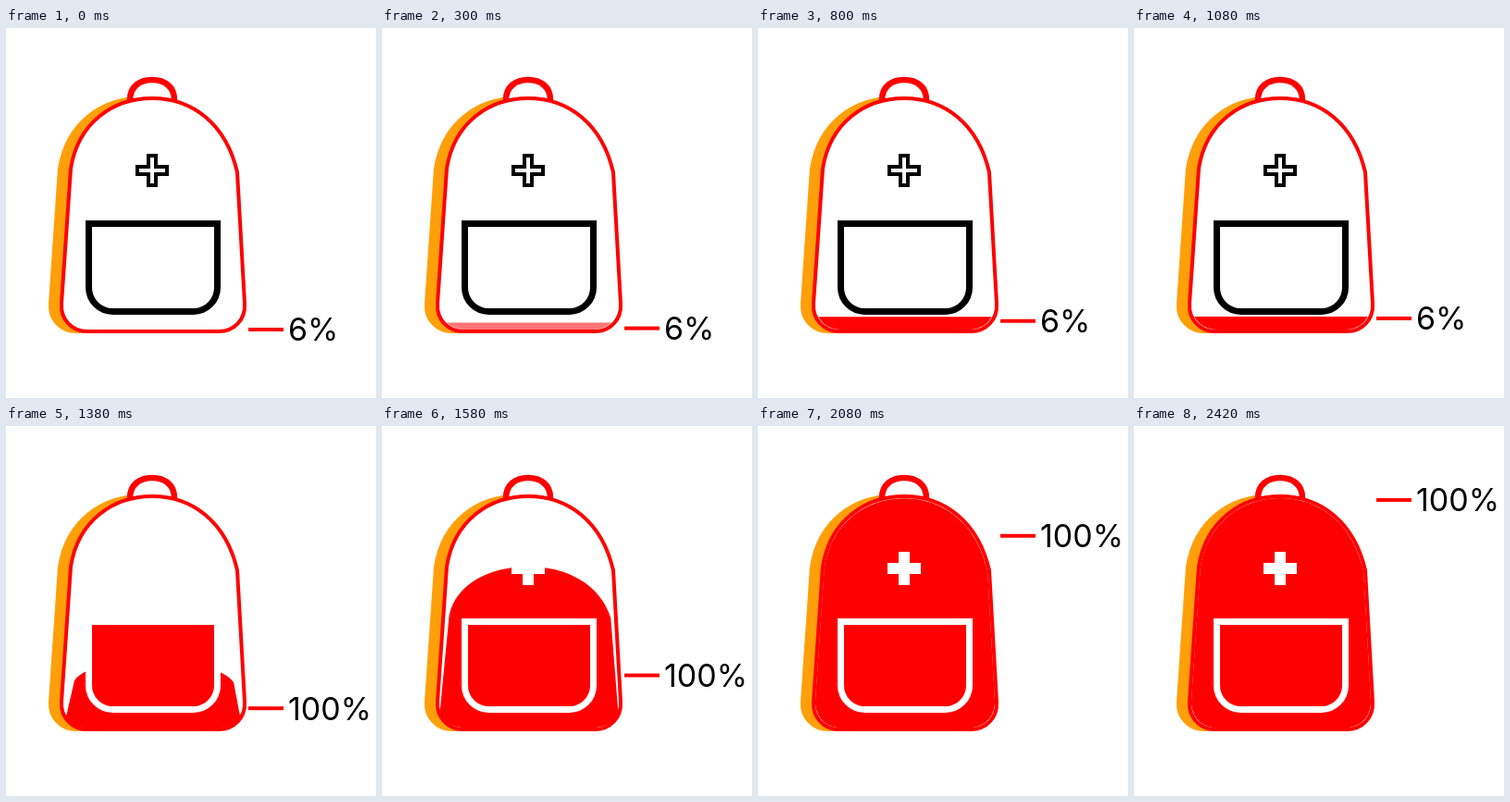
An HTML page with a canvas that plays this animation: 400 by 400 pixels, repeating every 2980 ms.

```html
<!DOCTYPE html>
<html lang="en">
<head>
<meta charset="utf-8">
<title>Backpack filling up</title>
<style>
  html, body { margin: 0; width: 100%; height: 100%; overflow: hidden; background: #fff; }
  canvas { display: block; width: 400px; height: 400px; }
</style>
</head>
<body>
<canvas id="stage" width="400" height="400"></canvas>
<script>
const ctx = document.getElementById('stage').getContext('2d');

const LOOP = 2980;
const FIRST_START = 20;
const SECOND_START = 1220;
const LABEL_TIME = 1200;
const FILL_TIME = 900;
const RED = '#ff0000';
const ORANGE = '#ff9f0a';

// Box of the bag's centre line, and the box inside its stroke
const OUTER = { x: 60, y: 76, w: 198, h: 252 };
const INNER = { x: 62, y: 78, w: 194, h: 248 };
const LOW = { x: 65, y: 312, w: 188, h: 14 };

const bag = new Path2D(
  'M70 152C78 102 116 76 158 76C202 76 238 104 250 156' +
  'L258 298C259 315 247 328 230 328H88C71 328 59 315 60 298Z');
const handle = new Path2D('M134 78C134 63 145 56 158 56S182 63 182 78');
const pocket = new Path2D(
  'M89.5 211.5H228.5V280.5A26 26 0 0 1 202.5 306.5H115.5A26 26 0 0 1 89.5 280.5Z');

const clamp = v => Math.min(1, Math.max(0, v));
const mix = (a, b, k) => a + (b - a) * k;

function bezier(x1, y1, x2, y2) {
  const at = (a, b, u) => 3 * (1 - u) ** 2 * u * a + 3 * (1 - u) * u * u * b + u ** 3;
  return x => {
    if (x <= 0 || x >= 1) return clamp(x);
    let lo = 0, hi = 1;
    for (let i = 0; i < 24; i++) {
      const mid = (lo + hi) / 2;
      if (at(x1, x2, mid) < x) lo = mid; else hi = mid;
    }
    return at(y1, y2, lo);
  };
}
const ease = bezier(0.25, 0.1, 0.25, 1);
const easeInOut = bezier(0.42, 0, 0.58, 1);

function stroke(path, color, width) {
  ctx.strokeStyle = color;
  ctx.lineWidth = width;
  ctx.stroke(path);
}

function fillBag(box) {
  ctx.save();
  ctx.translate(box.x, box.y);
  ctx.scale(box.w / OUTER.w, box.h / OUTER.h);
  ctx.translate(-OUTER.x, -OUTER.y);
  ctx.fill(bag);
  ctx.restore();
}

function plus(reach, half, color) {
  ctx.fillStyle = color;
  ctx.fillRect(158 - half, 154 - reach, 2 * half, 2 * reach);
  ctx.fillRect(158 - reach, 154 - half, 2 * reach, 2 * half);
}

function drawShell() {
  ctx.save();
  ctx.translate(-12, 0);
  ctx.fillStyle = ORANGE;
  ctx.fill(bag);
  stroke(bag, ORANGE, 4);
  ctx.restore();

  ctx.fillStyle = '#fff';
  ctx.fill(handle);
  stroke(handle, RED, 6.5);
  ctx.fill(bag);
  stroke(bag, RED, 4);
}

function drawLevel(low, full) {
  ctx.save();
  ctx.beginPath();
  ctx.rect(0, 326 - LOW.h * low, 400, 100);
  ctx.clip();
  ctx.globalAlpha = low;
  ctx.fillStyle = RED;
  fillBag(INNER);
  ctx.restore();

  if (full <= 0) return;
  const box = {};
  for (const key in LOW) box[key] = mix(LOW[key], INNER[key], full);
  ctx.save();
  if (full < 1) ctx.clip(bag);
  ctx.fillStyle = RED;
  fillBag(box);
  ctx.restore();
}

function drawDetails(packed) {
  ctx.fillStyle = packed ? RED : '#fff';
  ctx.fill(pocket);
  stroke(pocket, packed ? '#fff' : '#000', 7);
  plus(18, 6, packed ? '#fff' : '#000');
  if (!packed) plus(14, 2, '#fff');
}

function drawLabel(y, text) {
  ctx.fillStyle = RED;
  ctx.fillRect(262, y - 2, 38, 4);
  ctx.fillStyle = '#000';
  ctx.font = '34px Inter, "Liberation Sans", sans-serif';
  ctx.fillText(text, 305, y + 12.4);
}

function draw(t) {
  const first = t - FIRST_START;
  const second = t - SECOND_START;
  const packed = second >= 0;
  const y = packed
    ? mix(313.6, 80, easeInOut(clamp(second / LABEL_TIME)))
    : mix(326, 313.6, easeInOut(clamp(first / LABEL_TIME)));

  ctx.fillStyle = '#fff';
  ctx.fillRect(0, 0, 400, 400);
  drawShell();
  drawLevel(ease(clamp(first / FILL_TIME)), ease(clamp(second / FILL_TIME)));
  drawDetails(packed);
  drawLabel(y, packed ? '100%' : '6%');
}

function tick() {
  draw(performance.now() % LOOP);
  requestAnimationFrame(tick);
}
tick();
</script>
</body>
</html>
```
